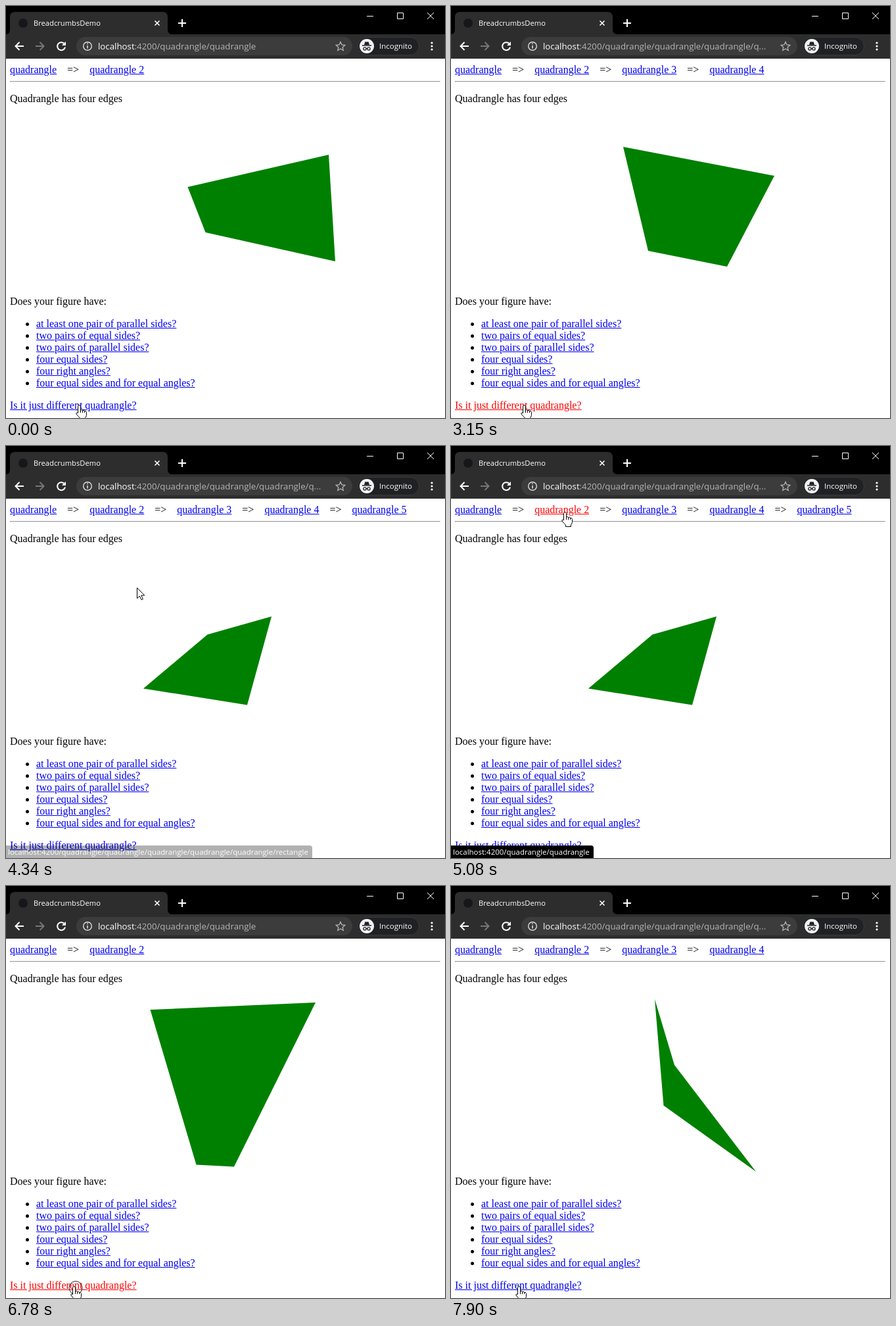
Recreate the animation shown at these times as an HTML page. Size 668 px wide and 626 px high, loop 8000 ms.

```html
<!DOCTYPE html>
<html lang="en">
<head>
<meta charset="utf-8">
<title>BreadcrumbsDemo</title>
<style>
  html, body { margin: 0; width: 668px; height: 626px; overflow: hidden; background: #fff; }
  body { position: relative; font: 16px/18px "Liberation Serif", serif; color: #000; }
  svg, #page > *, #status { position: absolute; }
  svg { left: 0; top: 0; }
  #page > * { left: 6px; margin: 0; white-space: nowrap; }
  #page hr { top: 114px; width: 653px; }
  #page ul { top: 474px; padding-left: 40px; }
  a { color: #00e; text-decoration: underline; }
  a.active { color: #f00; }
  .arrow { margin: 0 16px; }
  .ui, #status { font-family: "Open Sans", sans-serif; }
  #status {
    left: 0; top: 607px; height: 19px; padding: 0 6px 0 3px;
    background: #000; color: #fff; border-radius: 0 4px 0 0;
    font-size: 11.47px; line-height: 20px; white-space: nowrap;
  }
</style>
</head>
<body>
<svg class="ui" width="668" height="80" fill="none" stroke="#fff">
  <g stroke="none">
    <path d="M0 0H668V43H0Z" fill="#000"/>
    <path d="M0 43H668V80H0ZM0 43Q6 43 6 36V17Q6 9 14 9H238Q246 9 246 17V36Q246 43 253 43Z" fill="#2d2d2d"/>
    <rect x="107" y="47" width="420" height="28" rx="14" fill="#3c3c3c"/>
    <circle cx="26" cy="26" r="7" fill="#15171a"/>
    <g fill="#fff">
      <text x="42" y="30" font-size="11.2">BreadcrumbsDemo</text>
      <text x="140" y="66" font-size="13.28">localhost<tspan id="url" fill="#b4b4b4"></tspan></text>
      <circle cx="648" cy="56" r="1.6"/><circle cx="648" cy="61" r="1.6"/><circle cx="648" cy="66" r="1.6"/>
    </g>
  </g>
  <path d="M226.5 22.5l7 7m0-7l-7 7" stroke-width="1.6"/>
  <path d="M262 26h12m-6-6v12" stroke-width="2"/>
  <path d="M549 15.5h10M595.5 10.5h9v9h-9ZM641 10l10 10m0-10l-10 10"/>
  <g stroke-width="2">
    <path d="M27 61H14.5m6-6l-6 6 6 6"/>
    <path d="M45 61h12.5m-6-6l6 6-6 6" stroke="#777"/>
    <path d="M88.5 57A6 6 0 1 0 90 62.5"/>
    <path d="M91 54v6h-6Z" fill="#fff" stroke="none"/>
  </g>
  <circle cx="124" cy="61" r="6.3" stroke="#ddd" stroke-width="1.4"/>
  <path d="M124 60v4.5m0-8v1.7" stroke="#ddd" stroke-width="1.6"/>
  <path d="M509 54.5l2 4.5 4.8.5-3.6 3.2 1 4.8-4.2-2.5-4.2 2.5 1-4.8-3.6-3.2 4.8-.5Z" stroke="#b4b4b4" stroke-width="1.3"/>
  <rect x="535.5" y="47.5" width="93" height="27" rx="13.5" fill="#202124" stroke="#3a3a3c"/>
  <circle cx="549" cy="61" r="11" fill="#f1f3f4" stroke="none"/>
  <path d="M545 59l1.3-4.5h5.4L553 59Z" fill="#202124" stroke="none"/>
  <g stroke="#202124" stroke-width="1.3"><path d="M542 60h14m-8 4.7q1-.7 2 0"/><circle cx="546" cy="65" r="2.1"/><circle cx="552" cy="65" r="2.1"/></g>
  <text x="568" y="65" font-size="11.5" fill="#fff" stroke="none">Incognito</text>
</svg>

<main id="page">
  <div id="crumbs" style="top:88px"></div>
  <hr>
  <p style="top:132px">Quadrangle has four edges</p>
  <p style="top:440px">Does your figure have:</p>
  <ul>
    <li><a>at least one pair of parallel sides?</a></li>
    <li><a>two pairs of equal sides?</a></li>
    <li><a>two pairs of parallel sides?</a></li>
    <li><a>four equal sides?</a></li>
    <li><a>four right angles?</a></li>
    <li><a>four equal sides and for equal angles?</a></li>
  </ul>
  <a id="next" style="top:598px">Is it just different quadrangle?</a>
</main>
<svg width="668" height="626"><polygon id="figure" fill="green"/></svg>
<div id="status"></div>
<svg width="668" height="626" fill="#fff" stroke="#000">
  <circle id="ring" cx="106" cy="610.5" r="10" fill="none" stroke="#222"/>
  <path id="cursor" stroke-linejoin="round"/>
</svg>

<script>
const $ = id => document.getElementById(id);
const LOOP = 8000;
const CURSORS = {
  hand: 'M5.5.5Q7.5.5 7.5 2.5V8Q9.5 6.5 10.5 8.5Q12.5 7.3 13.3 9.4Q16 8.5 16.5 11.5V15.5Q16 18.5 14.5 19.5V22.5H6.5V20Q4 17.5 1 14Q.5 11 3.5 12.5V2.5Q3.5.5 5.5.5ZM7.5 8v4m3-3.5v3.5m3-2.5V12',
  arrow: 'M.5.5V16.5L4.3 13L7 18.7L9.4 17.6L6.8 12H11.8Z'
};
const path = n => ':4200' + '/quadrangle'.repeat(n);
const host = n => 'localhost' + path(n);
const longUrl = path(3) + '/q...';
const hand = (x, y) => ({ cursor: ['hand', x, y] });
const arrow = (x, y) => ({ cursor: ['arrow', x, y] });
const status = (text, opacity = 1) => ({ status: text, opacity });

// Each entry lists only what changes at that time.
const events = [
  [0, { crumbs: 2, url: path(2), active: 0, ring: false, figure: '276.5,275 491,226 501,388 303.5,344',
        ...hand(106, 606), ...status('', 0) }],
  [840, { crumbs: 3, url: path(3), figure: '286.5,239.5 474.5,278 481,415.5 246.5,352' }],
  [1980, { active: 'next', url: longUrl }],
  [2140, { active: 0, crumbs: 4, figure: '262,214 492,258 420,396 300,372' }],
  [3150, { active: 'next' }],
  [3300, { active: 0, crumbs: 5, figure: '306.5,286.5 404,259 367,393.5 209,368.5' }],
  [3860, { ...arrow(156, 554), ...status(host(4) + '/quadrang...') }],
  [3980, { ...arrow(180, 470), ...status(host(5) + '/rectangle') }],
  [4100, arrow(196, 380)],
  [4220, { ...arrow(202, 295), opacity: .65 }],
  [4340, { ...arrow(199, 215), opacity: .3 }],
  [4460, { ...arrow(190, 150), opacity: 0 }],
  [4580, arrow(179, 105)],
  [4700, hand(168, 100)],
  [4950, status(host(2))],
  [5080, { active: 2 }],
  [5210, { active: 0, crumbs: 2, url: path(2), figure: '219.5,188 471,177 347,426.5 289.5,423.5' }],
  [5640, arrow(166, 120)],
  [5790, arrow(148, 215)],
  [5910, { ...arrow(122, 340), opacity: .65 }],
  [6030, { ...arrow(100, 440), opacity: .3 }],
  [6150, { ...arrow(98, 520), opacity: 0 }],
  [6270, arrow(102, 565)],
  [6390, arrow(106, 589)],
  [6540, hand(101, 606)],
  [6660, hand(98, 608)],
  [6780, { active: 'next', ring: true }],
  [6940, { active: 0, ring: false, crumbs: 3, url: path(3), figure: '240,230 488,262 430,400 285,390' }],
  [7780, { active: 'next', url: longUrl }],
  [7900, { active: 0, crumbs: 4, figure: '310,172 340,272 464,434 323.5,333.5' }]
];

function crumb(number, active) {
  const label = 'quadrangle' + (number > 1 ? ' ' + number : '');
  return `<a class="${number === active ? 'active' : ''}">${label}</a>`;
}

function draw(scene) {
  const [kind, x, y] = scene.cursor;
  $('crumbs').innerHTML = Array.from({ length: scene.crumbs }, (_, i) => crumb(i + 1, scene.active))
    .join('<span class="arrow">=&gt;</span>');
  $('url').textContent = scene.url;
  $('next').className = scene.active === 'next' ? 'active' : '';
  $('figure').setAttribute('points', scene.figure);
  $('status').textContent = scene.status;
  $('status').style.opacity = scene.opacity;
  $('ring').style.display = scene.ring ? '' : 'none';
  $('cursor').setAttribute('d', CURSORS[kind]);
  $('cursor').setAttribute('transform', `translate(${x} ${y})`);
}

let shown = 0;
function tick() {
  const time = performance.now() % LOOP;
  const past = events.filter(([start]) => start <= time);
  if (past.length !== shown) {
    shown = past.length;
    draw(Object.assign({}, ...past.map(([, change]) => change)));
  }
  requestAnimationFrame(tick);
}
tick();
</script>
</body>
</html>
```
